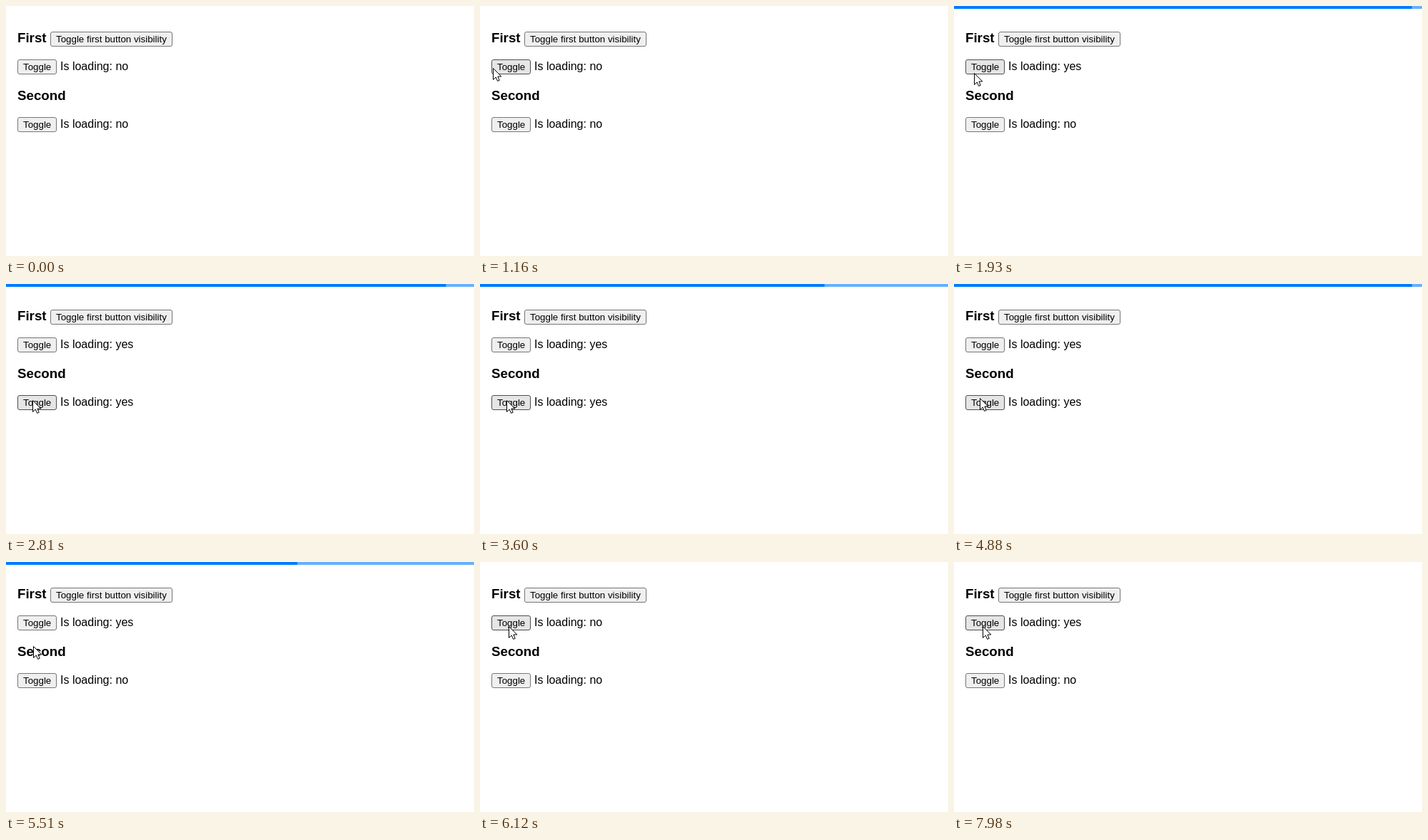
Recreate the animation shown at these times as an HTML page. Size 655 by 351 pixels, loop 8 s.

```html
<!DOCTYPE html>
<html lang="en">
<head>
<meta charset="utf-8">
<title>Loading toggles</title>
<style>
  html, body { margin: 0; width: 100%; height: 100%; overflow: hidden; background: #fff; }
  svg { display: block; width: 655px; height: 351px; font: 16px "Liberation Sans", Arial, sans-serif; }
  .heading { font-size: 18.72px; font-weight: bold; }
  .button text { font-size: 13.333px; }
  .button rect { fill: #efefef; stroke: #767676; }
  .button.hover rect { fill: #e5e5e5; stroke: #4f4f4f; }
  .button.pressed rect { fill: #f5f5f5; stroke: #8d8d8d; }
</style>
</head>
<body>
<svg viewBox="0 0 655 351">
  <g id="bar">
    <rect width="655" height="4" fill="#66b0ff"/>
    <rect id="fill" height="4" fill="#007bff"/>
  </g>
  <text class="heading" x="16" y="51">First</text>
  <g class="button">
    <rect x="62.5" y="36.5" width="170" height="20" rx="2.5"/>
    <text x="70" y="51">Toggle first button visibility</text>
  </g>
  <g class="button toggle">
    <rect x="16.5" y="75.5" width="54" height="20" rx="2.5"/>
    <text x="24" y="90">Toggle</text>
  </g>
  <text class="status" x="76" y="90"></text>
  <text class="heading" x="16" y="132">Second</text>
  <g class="button toggle">
    <rect x="16.5" y="156.5" width="54" height="20" rx="2.5"/>
    <text x="24" y="171">Toggle</text>
  </g>
  <text class="status" x="76" y="171"></text>
  <path id="cursor" d="M.5 .5V16.5L4.2 13 6.6 18.4 9.2 17.3 6.9 12H11.8Z" fill="#fff" stroke="#000"/>
</svg>
<script>
const LOOP = 8000, WIDTH = 655;
const SWEEP = 983, SWEEP_START = 1405;
const barTime = [[1680, 6110]];
const presses = [[1310, 1395], [2600, 2680], [4940, 4980], [6020, 6075], [7880, 7970]];
const loading = [
  [[1395, 6075], [7970, LOOP]],
  [[2680, 4980]],
];
// time, x, y of the pointer tip
const pointerPath = [
  [850, 1, 87], [1160, 18, 87], [1680, 18, 87], [1900, 28, 94], [2000, 28, 94],
  [2450, 36, 161], [2550, 37, 163], [3680, 37, 163], [4100, 36, 160],
  [5040, 36, 160], [5800, 40, 92], [5900, 40, 90], [LOOP, 40, 90],
];

const byId = id => document.getElementById(id);
const bar = byId('bar'), fill = byId('fill'), cursor = byId('cursor');
const toggles = document.querySelectorAll('.toggle');
const statuses = document.querySelectorAll('.status');
const within = (spans, t) => spans.some(([from, to]) => t >= from && t < to);
const show = (el, on) => el.setAttribute('visibility', on ? 'visible' : 'hidden');

function pointerAt(t) {
  const i = pointerPath.findIndex(p => p[0] > t);
  if (i < 1) return null;
  const [t0, x0, y0] = pointerPath[i - 1], [t1, x1, y1] = pointerPath[i];
  const k = (t - t0) / (t1 - t0);
  return [Math.round(x0 + (x1 - x0) * k), Math.round(y0 + (y1 - y0) * k)];
}

function draw(now) {
  const t = now % LOOP;

  const barVisible = within(barTime, t);
  show(bar, barVisible);
  if (barVisible) {
    const phase = (t - SWEEP_START) % SWEEP / SWEEP;
    fill.setAttribute('width', WIDTH * (1 - (1 - phase) ** 5));
  }

  const tip = pointerAt(t);
  show(cursor, tip);
  if (tip) cursor.setAttribute('transform', `translate(${tip})`);

  toggles.forEach((button, i) => {
    const top = 75 + 81 * i;
    const hover = !!tip && tip[0] >= 16 && tip[0] < 71 && tip[1] >= top && tip[1] < top + 21;
    button.classList.toggle('hover', hover);
    button.classList.toggle('pressed', hover && within(presses, t));
    statuses[i].textContent = 'Is loading: ' + (within(loading[i], t) ? 'yes' : 'no');
  });
}

const start = performance.now();
function tick() {
  draw(performance.now() - start);
  requestAnimationFrame(tick);
}
tick();
</script>
</body>
</html>
```
